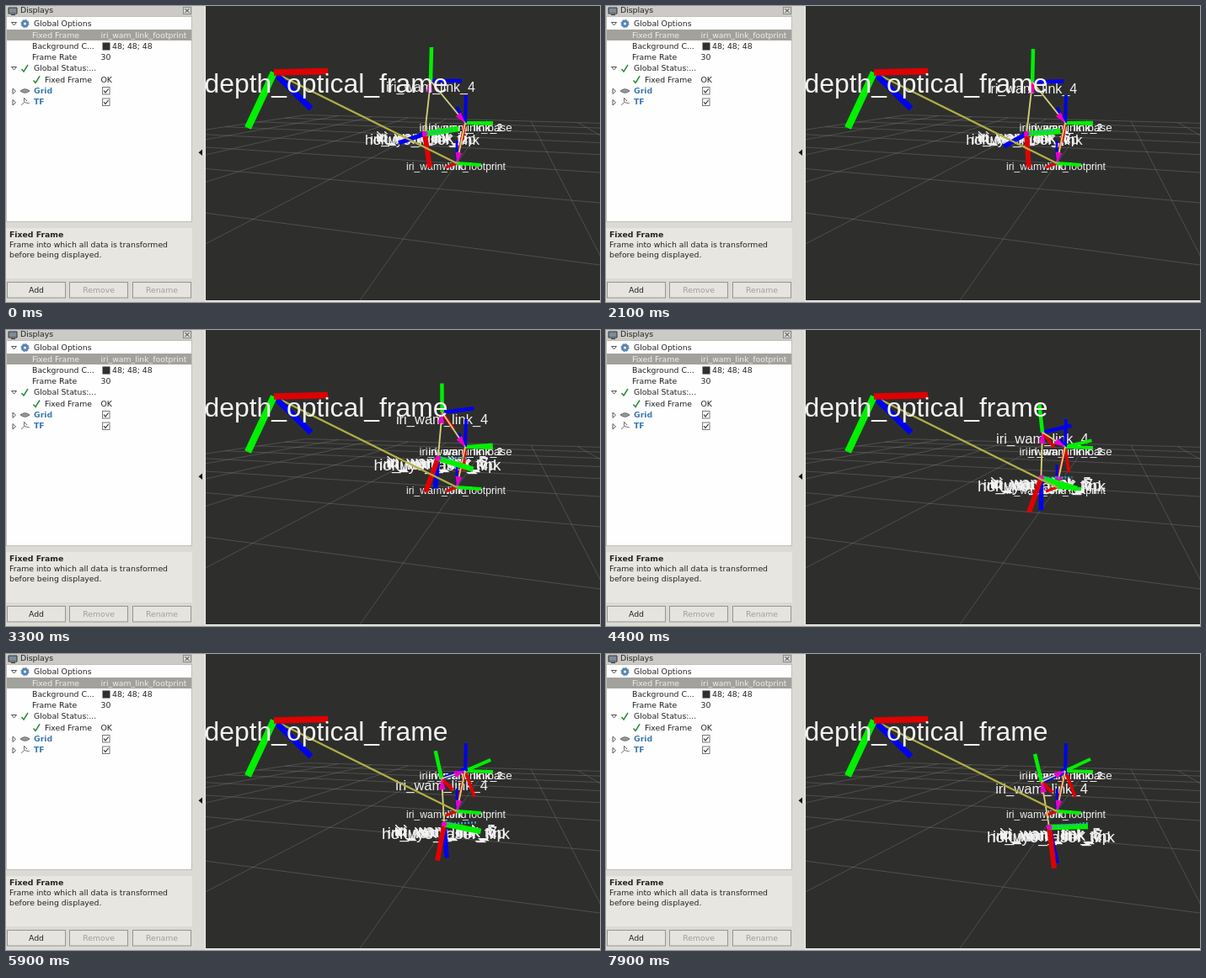
An HTML page that plays this animation: 705 by 352 pixels, repeating every 8000 ms.

```html
<!DOCTYPE html>
<html lang="en">
<head>
<meta charset="utf-8">
<title>Robot arm transforms</title>
<style>
html, body { margin: 0; width: 100%; height: 100%; overflow: hidden; background: #dcdad5; }
svg { display: block; width: 705px; height: 352px; }
#panel text { font: 9.3px "DejaVu Sans", sans-serif; fill: #222; }
#panel .bold { font-weight: bold; }
#panel .link { font-weight: bold; fill: #3b78b0; }
#panel .pale { fill: #eeeeec; }
#panel .off { fill: #a19f9a; }
.label { font-family: "Liberation Sans", Arial, sans-serif; fill: #f2f2f2; text-anchor: middle; }
.check { fill: none; stroke: #2f8a3a; stroke-width: 1.5; }
.box { fill: #fff; stroke: #777; }
.button { fill: #e6e4df; stroke: #96948f; }
</style>
</head>
<body>
<svg viewBox="0 0 705 352">
  <defs><clipPath id="view"><rect x="237" width="468" height="350"/></clipPath></defs>
  <g clip-path="url(#view)">
    <rect x="237" width="468" height="350" fill="#2e2f2d"/>
    <path id="grid" fill="none" stroke="#777" stroke-opacity=".55" stroke-width=".8"/>
    <g id="labels"></g>
    <g id="arm"></g>
    <g id="near"></g>
  </g>
  <g id="panel">
    <path d="M0 0H237V352H0Z" fill="#dcdad5"/>
    <path d="M0 0H221V12H0Z" fill="#cbcac6"/>
    <path d="M236.5 0V350.500H705" fill="none" stroke="#f4f3f0"/>
    <rect x=".5" y="12.5" width="220" height="244" fill="#fdfefd" stroke="#c0beb9"/>
    <rect x="1" y="28" width="219" height="13" fill="#a3a19c"/>
    <rect y="264" width="221" height="60" fill="#e8e6e1"/>
    <path d="M3 2H13V9H3ZM6 10.500H11" fill="#7d8c98" stroke="#333"/>
    <rect x="210.500" y="1.500" width="9" height="8" fill="#d8d7d3" stroke="#888"/>
    <path d="M212.500 3L217.500 8M217.500 3L212.500 8" stroke="#333"/>
    <g fill="#fff" stroke="#555">
      <path d="M6.500 19.500H12.500L9.500 23ZM6.500 72.500H12.500L9.500 76Z"/>
      <path d="M8 98L11.500 101.200L8 104.500ZM8 111.500L11.500 114.800L8 118Z"/>
    </g>
    <circle cx="22.500" cy="21" r="3" fill="none" stroke="#5a86b4" stroke-width="3"/>
    <circle cx="22.500" cy="21" r="4.600" fill="none" stroke="#5a86b4" stroke-dasharray="1.800 1.800"/>
    <path class="check" d="M18.500 75L21 78L26 70M32.500 88.500L35 91.500L40 83.500"/>
    <path d="M17 101Q22.500 96.500 28 101Q22.500 105.500 17 101Z" fill="#999" stroke="#666"/>
    <path d="M18 118L21.500 114.500V109M21.500 114.500L28 116" fill="none" stroke="#777"/>
    <path d="M22 110L25 113" stroke="#a05050"/>
    <rect x="114.500" y="43.500" width="9" height="9" fill="#303030"/>
    <rect class="box" x="114.500" y="96.500" width="8.500" height="8.500"/>
    <rect class="box" x="114.500" y="110" width="8.500" height="8.500"/>
    <path d="M116 100.500L118 103L121.500 98.500M116 114L118 116.500L121.500 112" fill="none" stroke="#333" stroke-width="1.200"/>
    <path d="M233 170.500V178L228.500 174.200Z" fill="#111"/>
    <rect class="button" x="1.500" y="328.500" width="69" height="18.500"/>
    <rect class="button" x="75.500" y="328.500" width="69" height="18.500"/>
    <rect class="button" x="150.500" y="328.500" width="69" height="18.500"/>
    <g transform="translate(0 -.7)">
      <text x="17" y="8.500">Displays</text>
      <text x="33" y="24.500">Global Options</text>
      <text x="31" y="38.500" class="pale">Fixed Frame</text>
      <text x="112.500" y="38.500" class="pale">iri_wam_link_footprint</text>
      <text x="31" y="51.500">Background C...</text>
      <text x="126" y="51.500">48; 48; 48</text>
      <text x="31" y="65">Frame Rate</text>
      <text x="112.500" y="65">30</text>
      <text x="33" y="78">Global Status:...</text>
      <text x="46" y="91.500">Fixed Frame</text>
      <text x="112.500" y="91.500">OK</text>
      <text x="33" y="104.500" class="link">Grid</text>
      <text x="33" y="118" class="link">TF</text>
      <text x="4" y="275.500" class="bold">Fixed Frame</text>
      <text x="4" y="287.500">Frame into which all data is transformed</text>
      <text x="4" y="299.500">before being displayed.</text>
      <text x="36" y="342" text-anchor="middle">Add</text>
      <text x="110" y="342" text-anchor="middle" class="off">Remove</text>
      <text x="185" y="342" text-anchor="middle" class="off">Rename</text>
    </g>
  </g>
</svg>
<script>
const RED = '#e00000', GREEN = '#00f000', BLUE = '#0000f0', YELLOW = '#d6d27c', PINK = '#e800c8';
const LOOP = 8000, STEP = 100;

const byId = id => document.getElementById(id);
function set(node, attrs) {
  for (const key in attrs) node.setAttribute(key, attrs[key]);
}
function add(layer, tag, attrs) {
  const node = document.createElementNS('http://www.w3.org/2000/svg', tag);
  set(node, attrs);
  byId(layer).append(node);
  return node;
}

// The arm lifts, then folds down, while the wrist turns slowly; each runs from 0 to 1
const sigmoid = (mid, width) => t => 1 / (1 + Math.exp((mid - t) / width));
const lift = sigmoid(2600, 280);
const fold = sigmoid(4370, 560);
const drift = t => Math.min(1, Math.max(0, (t - 2600) / 5300));
const turn = t => drift(t) ** 2;

const fixed = (x, y) => () => [x, y];
const plus = (a, b) => t => {
  const p = a(t), q = b(t);
  return [p[0] + q[0], p[1] + q[1]];
};
// From rest to lifted, and on to the end pose as the second motion runs
const move = (rest, lifted, end, second) => t =>
  rest.map((r, i) => r + lift(t) * (lifted[i] - r) + second(t) * (end[i] - lifted[i]));

const camera = fixed(318, 79), foot = fixed(535, 187), shoulder = fixed(545, 139);
const elbow = move([504, 89], [519, 90], [517, 152], fold);
const wrist = plus(elbow, move([-7, 63], [-7, 54], [9, 54], drift));

const updates = [];
function bar(layer, from, offset, color, width, dash = 'none') {
  const node = add(layer, 'line', { stroke: color, 'stroke-width': width, 'stroke-dasharray': dash });
  const to = plus(from, offset);
  updates.push(t => {
    const [x1, y1] = from(t), [x2, y2] = to(t);
    set(node, { x1, y1, x2, y2 });
  });
}
function arrow(from, to) {
  const shaft = add('arm', 'line', { stroke: YELLOW, 'stroke-width': 1.8 });
  const head = add('arm', 'path', { fill: PINK });
  updates.push(t => {
    const [x1, y1] = from(t), [x2, y2] = to(t);
    const d = Math.hypot(x2 - x1, y2 - y1), u = (x2 - x1) / d, v = (y2 - y1) / d;
    const bx = x2 - 13 * u, by = y2 - 13 * v;
    set(shaft, { x1, y1, x2, y2 });
    set(head, { d: `M${x2} ${y2}L${bx - 4 * v} ${by + 4 * u}L${bx + 4 * v} ${by - 4 * u}Z` });
  });
}
function label(layer, text, at, size, dx = 0, dy = 0) {
  const node = add(layer, 'text', { class: 'label' });
  node.textContent = text;
  updates.push(t => {
    const [x, y] = at(t), s = size(t);
    set(node, { x: x + dx, y: y + dy + s * .34, 'font-size': s });
  });
}

// Ground grid: ten by ten cells in perspective, clipped near the eye
function drawGrid() {
  const yaw = 17 * Math.PI / 180, c = Math.cos(yaw), s = Math.sin(yaw), near = .3;
  const place = (x, y) => [.587 + y * c - x * s, 3.9 - y * s - x * c];
  const project = ([side, depth]) => `${(471 + 425 * side / depth).toFixed(1)} ${(93.5 + 365 / depth).toFixed(1)}`;
  const clip = (a, b) => {
    if (a[1] >= near) return a;
    const k = (near - a[1]) / (b[1] - a[1]);
    return [a[0] + k * (b[0] - a[0]), near];
  };
  const line = (a, b) => a[1] < near && b[1] < near ? '' : `M${project(clip(a, b))}L${project(clip(b, a))}`;
  let d = '';
  for (let i = -5; i <= 5; i++)
    d += line(place(i, -5), place(i, 5)) + line(place(-5, i), place(5, i));
  set(byId('grid'), { d });
}
drawGrid();

// Footprint and shoulder frames
bar('arm', foot, fixed(0, -27), BLUE, 2.8);
bar('arm', foot, fixed(-13, 5), RED, 3);
bar('arm', foot, fixed(29, 2), GREEN, 3.8);
bar('arm', shoulder, fixed(-7, 32), RED, 3);
bar('arm', shoulder, move([-4, 21], [-4, 29], [12, 31], fold), RED, 3.8);
bar('arm', shoulder, fixed(33, 1), GREEN, 3.8);
bar('arm', shoulder, move([33, 0], [33, -1], [30, -14], fold), GREEN, 4);
bar('arm', shoulder, move([-10, -19], [-8, -18], [-5, -1], fold), BLUE, 3.5);
bar('arm', shoulder, fixed(1, -33), BLUE, 3.8);

// Elbow frame
bar('arm', elbow, move([37, 0], [39, -4], [30, -12], fold), BLUE, 4.5);
bar('arm', elbow, move([-1, 6], [15, 22], [13, 13], fold), RED, 4);
bar('arm', elbow, move([1, -40], [1, -34], [-8, -33], fold), GREEN, 4.5);

arrow(elbow, shoulder);
arrow(shoulder, foot);

// Wrist frame
bar('arm', wrist, move([-31, 11], [-1, 38], [9, 43], turn), BLUE, 5.5);
bar('arm', wrist, move([6, 40], [-17, 40], [6, 49], turn), RED, 6);
bar('arm', wrist, move([40, -6], [42, 15], [46, -1], turn), GREEN, 6.5);
bar('arm', wrist, move([33, -5], [36, 0], [46, -5], turn), '#3aa0c8', 2.5, '2 2');
arrow(wrist, elbow);
const hub = add('arm', 'circle', { r: 3.2, fill: PINK });
updates.push(t => {
  const [cx, cy] = wrist(t);
  set(hub, { cx, cy });
});

label('labels', 'iri_wam_link_footprint', foot, () => 12.2, -1, 4);
label('labels', 'world', foot, () => 12.2, -3, 4);
for (const end of ['base', 1, 2])
  label('labels', 'iri_wam_link_' + end, shoulder, () => 13.4, .5, 5.500);
label('labels', 'iri_wam_link_4', elbow, t => 16 + .6 * lift(t), 0, 8);

const wristText = plus(wrist, move([-3, 7.500], [-1, 8], [2, 12], fold));
const wristSize = t => 17 + 2 * lift(t);
label('labels', 'hokuyo_laser_link', wristText, wristSize);
label('labels', 'iri_wam_link_tcp', wristText, wristSize, 1, -1);
for (const n of [5, 6, 7])
  label('labels', 'iri_wam_link_' + n, wristText, t => .96 * wristSize(t), n - 6, n - 9);

// Camera frame, closest to the eye
bar('near', camera, fixed(217, 108), '#b3af45', 2.2);
bar('near', camera, fixed(44, 43), BLUE, 7);
bar('near', camera, fixed(-31, 66), GREEN, 8.5);
bar('near', camera, fixed(64, -1.500), RED, 7.5);
label('near', 'camera_depth_optical_frame', camera, () => 31.9, 0, 13.500);

const start = performance.now();
function draw(now) {
  const t = Math.floor(Math.max(0, now - start) % LOOP / STEP) * STEP;
  for (const update of updates) update(t);
  requestAnimationFrame(draw);
}
draw(start);
</script>
</body>
</html>
```
